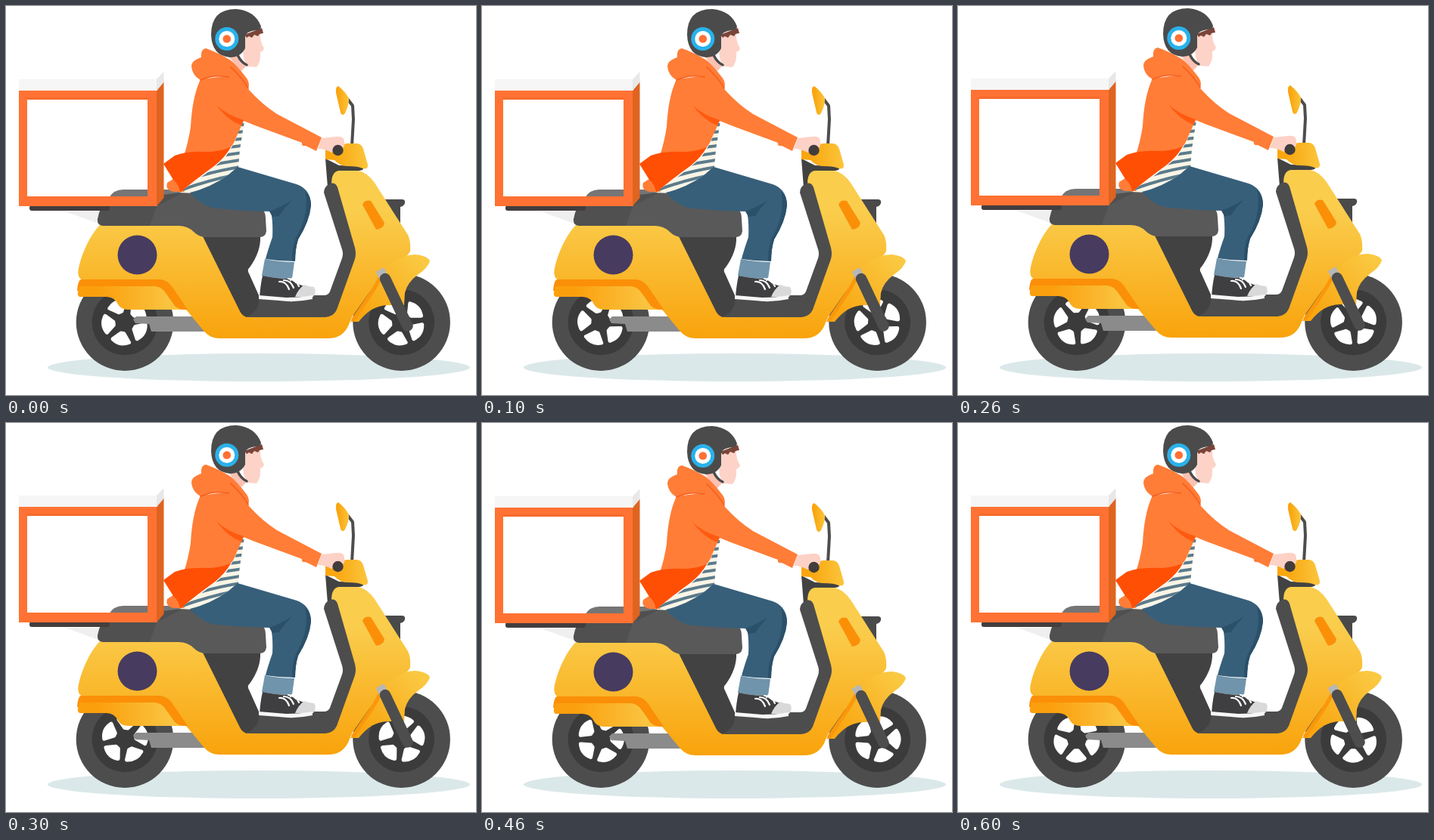
Animation, 621 px wide and 515 px high, one loop 0.7 s. Source, as an HTML page:

```html
<!DOCTYPE html>
<html lang="en">
<head>
<meta charset="utf-8">
<title>Scooter courier</title>
<style>
  html, body { margin: 0; width: 100%; height: 100%; overflow: hidden; background: #fff; }
  svg { display: block; width: 100vw; height: 100vh; }
  .line { fill: none; stroke-linecap: round; stroke-linejoin: round; }
</style>
</head>
<body>
<svg viewBox="0 0 621 515">
  <defs>
    <linearGradient id="paint" gradientUnits="userSpaceOnUse" x1="0" y1="270" x2="0" y2="440">
      <stop offset="0" stop-color="#facd4d"/><stop offset="1" stop-color="#f9a30c"/>
    </linearGradient>
    <linearGradient id="rearGuard">
      <stop offset="0.2" stop-color="#fb9f0d"/><stop offset="0.85" stop-color="#fac440"/>
    </linearGradient>
    <linearGradient id="frontGuard" x1="1" y1="0" x2="0.1" y2="0.8">
      <stop offset="0.1" stop-color="#fac942"/><stop offset="1" stop-color="#f9a611"/>
    </linearGradient>
    <linearGradient id="gold">
      <stop offset="0.2" stop-color="#f9a60f"/><stop offset="1" stop-color="#fbc53c"/>
    </linearGradient>
    <clipPath id="shirt">
      <path d="M312 150L303 178Q298 188 290 200Q270 220 228 247L250 248Q278 236 307 214L309 190L315 152Z"/>
    </clipPath>
    <g id="wheel">
      <circle r="64.3" fill="#4d4d4d"/>
      <circle r="43.5" fill="#3b3b3b"/>
      <g id="holes" fill="#fff" stroke="#fff" stroke-width="5" stroke-linejoin="round"></g>
    </g>
  </defs>

  <ellipse cx="334" cy="478.5" rx="279" ry="18.5" fill="#dbe8e9"/>
  <use href="#wheel" x="157" y="418.7"/>
  <use href="#wheel" x="522.6" y="418.7"/>

  <g id="ride">
    <!-- scooter frame -->
    <path fill="#8b8b8b" d="M172 411H265V431H192L189 421L171 420L168 415Z"/>
    <path fill="#4a4a4a" d="M500 256H523Q528 256 527 261Q526 265 521 266V309Z"/>
    <path fill="#424242" d="M422 202Q434 208 440 211L471 212Q475 217 467 218L441 218Q433 221 431 238L425 240Z"/>
    <path fill="url(#paint)" d="M126 288C111 302 99 330 95.500 350Q94 362 104 364H205L238 402L262 431Q270 440 282 440H426Q444 440 452 424L457 412L490 365Q500 345 515 340Q530 333 534 325Q535 311 531 303L487 234Q477 220 465 218H440Q430 219 430 236L452 322Q455 328 452 336L432 396Q430 404 420 404H318L258 300Q250 288 235 288Z"/>
    <path fill="#4d4d4d" d="M428 235Q420 239 420 247L444 322Q446 328 444 334L428 378Q426 383 420 383H325L309 403Q313 412 322 412H422Q433 411 437 402L461 335Q463 328 461 320L438 240Q435 233 428 235Z"/>
    <path fill="#424242" d="M260 305H336Q337 325 322 346Q318 349 321 354L334 383Q337 402 318 412Q312 410 309 404Z"/>
    <path fill="#fb8f08" d="M471 263Q474 256 482 258L500 287Q499 295 489 296Z"/>
    <path fill="#fb8f08" d="M99 362H204Q213 363 219 371L240 402H224L94 377Q95 363 99 362Z"/>
    <path fill="url(#rearGuard)" d="M97 371H197Q206 372 211 380L223 397Q228 402 237 402H161Q152 402 148 395Q143 385 133 385H100Q94 386 95 379Z"/>
    <circle cx="173.5" cy="329.5" r="26" fill="#473b60"/>

    <!-- seat -->
    <path fill="#efefef" d="M78 272H126L122 288Z"/>
    <path fill="#757575" d="M136 254Q142 243 155 243H245V266H132Z"/>
    <path fill="#505050" d="M137 252H190L240 246V291H128Q120 290 121 282Q124 264 137 252Z"/>
    <path fill="#595959" d="M199 265L236 246L300 250V267L336 268Q343 270 343 281L344 298Q343 306 335 306H262Q254 305 248 299Q240 291 228 291H190Z"/>

    <!-- cargo box -->
    <rect x="31" y="264" width="106" height="7" rx="3" fill="#433d3d"/>
    <path fill="#ff7233" fill-rule="evenodd" d="M17 112H200V265H17ZM28 123V252H187V123Z"/>
    <path fill="#f66a2b" d="M28 121H187V124H28Z"/>
    <path fill="#df6420" d="M199 112L208.500 100V254L199 265Z"/>
    <path fill="#f6f6f6" d="M17 97H200V112H17Z"/>
    <path fill="#e8e8e8" d="M199 97L208.500 87V101L199 112Z"/>

    <!-- rider's legs -->
    <g clip-path="url(#shirt)">
      <path fill="#f9f5e7" d="M220 145H320V255H220Z"/>
      <g id="stripes" class="line" stroke="#5b7b8b" stroke-width="4"></g>
    </g>
    <path fill="#375f7a" d="M243 247Q280 238 306 213L384 236Q403 243 403 264Q401 285 386 309Q382 322 382 338Q362 338 343 335Q345 326 352 306Q353 285 350 272Q300 271 272 267Q256 262 243 247Z"/>
    <path fill="#2b5069" d="M348 272Q364 266 378 257Q367 268 361 278L352 279ZM395 245Q403 252 403 264Q401 285 386 309Q382 322 382 338L378 337Q378 318 383 307Q402 275 395 245Z"/>
    <path fill="#7094ab" d="M342 335Q362 339 381 339L378 361Q356 361 338 357Z"/>
    <path fill="#3f3f42" d="M339 357Q357 361 375 361Q386 371 405 373L406 386H335Q336 370 339 357Z"/>
    <path fill="#d9d9d9" d="M382 385Q386 375 394 369Q400 372 407 372Q411 378 406 385Z"/>
    <path fill="#f7f7f7" d="M334 383L370 386Q390 386 405 383V388Q382 393 361 390L334 388Z"/>
    <path class="line" stroke="#fff" stroke-width="2.2" d="M361 365Q370 364 374 375M367 363Q376 363 380 373M373 361Q383 362 387 371M376 363L380 359M383 366L389 364"/>

    <!-- handlebar -->
    <path class="line" stroke="#4d4d4d" stroke-width="4" d="M452 124L458 132L459 150L457 185"/>
    <path fill="url(#gold)" d="M439 106Q435 107 436 115L442 141Q444 147 448 142Q454 129 453 122Q448 113 439 106Z"/>
    <path fill="url(#gold)" d="M422 190L450 182H464Q470 183 472 189L478 210Q479 217 471 215Q466 212 450 212Q440 211 434 204L422 203Z"/>
    <path fill="#fdd1c5" d="M417 175L436 173Q447 171 447 180Q449 187 442 189L430 194Q421 189 412 189Z"/>
    <circle cx="438.500" cy="191" r="7.200" fill="#423d3d"/>

    <!-- jacket -->
    <path fill="#fbc2b3" d="M294 66L307 66L317 80L309 88Z"/>
    <path fill="#ff7d37" d="M257 97Q246 120 244 160Q241 180 235 198L292 192Q301 184 304 174L314 152Q328 158 345 164L391 181Q390 186 396 185L410 192L417 174L358 143Q338 130 321 111Q312 94 296 92Z"/>
    <path fill="#ff7d37" d="M264 56Q257 57 258 68Q245 72 245 80Q246 92 257 98Q275 91 292 93Q310 99 320 110Q323 101 316 93Q306 80 297 72Q281 62 264 56Z"/>
    <path class="line" stroke="#f65b1b" stroke-width="1.500" d="M257 98Q275 90 294 94M297 81Q313 96 320 109"/>
    <path fill="#ff5a10" d="M278 131Q291 144 314 151L311 158Q292 151 278 131Z"/>
    <path fill="#ff7d37" d="M221 229L213 234Q210 244 222 246H236Z"/>
    <path fill="#ff4f04" d="M208 209L223 198Q240 192 264 193Q282 193 297 187Q290 200 275 212Q254 227 230 247Q229 237 221 230Z"/>

    <!-- head -->
    <path fill="#fdd3c8" d="M315 38L336 35Q335 47 341 56Q340 60 336 61Q337 74 331 81L319 80Q311 68 314 55Z"/>
    <path fill="#7b4439" d="M315 38L338 29L340 36L335 37L333 40L328 38L325 42L321 40L318 42Z"/>
    <path fill="#4b4b4b" d="M271 38Q271 4 304 4Q329 6 337 27Q337 32 330 32Q317 34 316 40V56Q310 68 296 68Q272 66 271 38Z"/>
    <path class="line" stroke="#4b4b4b" stroke-width="3.500" d="M306 65Q311 75 318 78"/>
    <circle cx="291.800" cy="43.500" r="15.500" fill="#2ab1ea"/>
    <circle cx="291.800" cy="43.500" r="10.500" fill="#fff"/>
    <circle cx="291.800" cy="43.500" r="5.300" fill="#ff7034"/>

    <!-- front mudguard and fork -->
    <path fill="url(#frontGuard)" d="M490 360Q515 329 541 329Q558 331 560 338Q557 347 545 355Q530 366 527 380L526 396Q515 396 505 396C488 397 478 403 466 418H455L478 384Z"/>
    <path class="line" stroke="#fb970b" stroke-width="5" d="M459 415L480 384Q489 371 494 360"/>
    <path stroke="#b7b7b7" stroke-width="12" d="M494 349L500 361"/>
    <path class="line" stroke="#4d4d4d" stroke-width="14.500" d="M501 361L530.500 423.500"/>
  </g>
</svg>
<script>
  const FRAME = 100, FRAMES = 7, SPOKES = 5, STEP = 360 / SPOKES;
  const $ = id => document.getElementById(id);
  const range = n => [...Array(n).keys()];

  $('holes').innerHTML = range(SPOKES).map(i =>
    `<path transform="rotate(${i * STEP})" d="M15 -2L25 -11Q32 0 25 11L15 2Z"/>`).join('');

  // stripes tilt more towards the hem
  $('stripes').innerHTML = range(10).map(i => {
    const drop = 8 + i * 2.4;
    return `<path d="M315 ${157 + i * 9.2}q-45 ${drop * 0.3} -90 ${drop}"/>`;
  }).join('');

  function draw(now) {
    const frame = Math.floor(now / FRAME) % FRAMES;
    const lift = frame % 4 >> 1;
    $('holes').setAttribute('transform', `rotate(${30 + frame * STEP / FRAMES})`);
    $('ride').setAttribute('transform', `translate(0 ${-lift})`);
  }

  let start;
  function tick(now) {
    start ??= now;
    draw(now - start);
    requestAnimationFrame(tick);
  }
  draw(0);
  requestAnimationFrame(tick);
</script>
</body>
</html>
```
